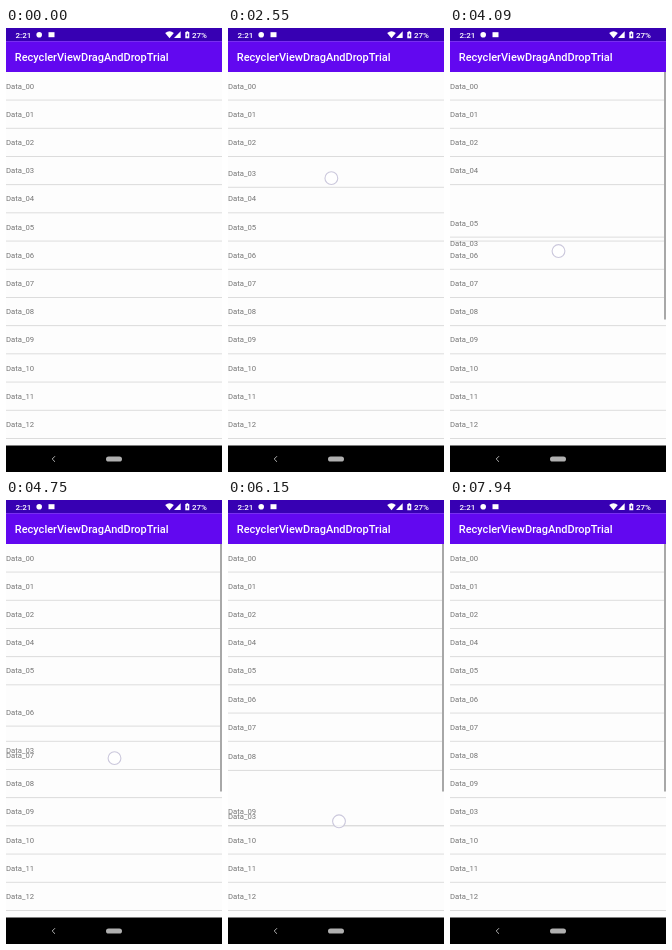
An HTML page that plays this animation: 216x444 px, repeating every 8 s.

```html
<!DOCTYPE html>
<html lang="en">
<head>
<meta charset="utf-8">
<title>Drag and drop list</title>
<style>
  html, body { margin: 0; width: 100%; height: 100%; overflow: hidden; background: #fdfdfd; }
  svg { display: block; font-family: Roboto, Arial, sans-serif; }
  .bar { fill: #fff; font-weight: 500; }
  #list { fill: #757575; font-size: 7.7px; }
  #list rect { fill: #d9d9d9; }
</style>
</head>
<body>
<svg width="216" height="444" viewBox="0 0 216 444">
  <rect width="216" height="444" fill="#fdfdfd"/>
  <g id="list"></g>
  <rect id="scrollbar" x="214" y="44" width="2" height="247.5" fill="#a8a8a8"/>

  <rect width="216" height="13.2" fill="#3700b3"/>
  <rect y="13.2" width="216" height="30.8" fill="#6208f0"/>
  <g class="bar">
    <text x="9.5" y="9.7" font-size="8">2:21</text>
    <circle cx="33.2" cy="6.8" r="2.8"/>
    <rect x="42.5" y="4.2" width="6" height="5"/>
    <path d="M159.2 5 Q163.5 1.6 167.8 5 L163.5 10.2 Z"/>
    <path d="M174.7 3.2 V10 H168 Z"/>
    <path d="M179.3 4 H180.4 V3.2 H182.2 V4 H183.3 V10.2 H179.3 Z"/>
    <path d="M181.7 5 L180.4 7.4 H181.2 V9.2 L182.4 6.8 H181.7 Z" fill="#3700b3"/>
    <text x="186" y="9.7" font-size="8">27%</text>
    <text x="8.8" y="33" font-size="11">RecyclerViewDragAndDropTrial</text>
  </g>

  <rect y="417.5" width="216" height="26.5" fill="#000"/>
  <path d="M49 428.2 L46.2 431 L49 433.8" fill="none" stroke="#b0b0b0" stroke-width="1"/>
  <rect x="100" y="428.4" width="16" height="5.2" rx="2.6" fill="#b0b0b0"/>

  <circle id="touch" r="6.4" fill="#fff" fill-opacity=".75" stroke="#cbc8dc" stroke-width="1.1"/>
</svg>
<script>
const LOOP = 8000, ROW = 28.2, TOP = 44, MOVE = 250, LAG = 100;
const DRAGGED = 3, PRESS = 1220, RELEASE = 7520;
// Start times at which rows 4 to 9 move up past the dragged row
const swaps = [3235, 4030, 4620, 5200, 5930, 6140];
// Finger path: time, x, y
const path = [
  [1220, 102.5, 145], [2350, 102.5, 145], [2700, 104, 154], [3250, 106.5, 181],
  [4090, 108.5, 223], [5350, 108.5, 290], [5750, 110, 310], [6150, 111, 321.3],
  [6600, 111, 324], [7220, 111, 324], [7450, 111, 328]
];

const $ = id => document.getElementById(id);
const clamp = v => Math.max(0, Math.min(1, v));
const ease = v => 0.5 - 0.5 * Math.cos(Math.PI * clamp(v));
const slotY = i => TOP + ROW * i;

function add(parent, tag, attrs) {
  const el = document.createElementNS("http://www.w3.org/2000/svg", tag);
  for (const k in attrs) el.setAttribute(k, attrs[k]);
  return parent.appendChild(el);
}

const rows = Array.from({ length: 13 }, (_, i) => {
  const line = add($("list"), "rect", { y: ROW - 0.6, width: 216, height: 0.9 });
  const label = add($("list"), "text", { y: 16.7 });
  label.textContent = "Data_" + String(i).padStart(2, "0");
  return { line, label };
});

function finger(t) {
  let i = 1;
  while (i < path.length - 1 && t > path[i][0]) i++;
  const [t0, x0, y0] = path[i - 1], [t1, x1, y1] = path[i];
  const p = clamp((t - t0) / (t1 - t0));
  return [x0 + (x1 - x0) * p, y0 + (y1 - y0) * p];
}

function place(el, x, y) {
  el.setAttribute("transform", `translate(${x} ${y})`);
}

function draw(t) {
  const done = swaps.filter(s => t >= s);
  const slot = slotY(DRAGGED + done.length);
  const held = slotY(DRAGGED) + finger(Math.min(t, RELEASE) - LAG)[1] - path[0][2];
  const dragY = held + (slot - held) * ease((t - RELEASE) / MOVE);
  // The divider rests in the new slot while neighbours are moving
  const settling = done.length && t - done[done.length - 1] < MOVE;

  rows.forEach(({ line, label }, i) => {
    const start = swaps[i - DRAGGED - 1];
    const y = i === DRAGGED ? dragY
      : slotY(i) - (start ? ROW * ease((t - start) / MOVE) : 0);
    place(label, 0, y);
    place(line, 0, i === DRAGGED && settling ? slot : y);
  });

  place($("touch"), ...finger(t));
  $("touch").setAttribute("opacity", t < PRESS ? 0 : 1 - clamp((t - RELEASE) / 100));
  $("scrollbar").setAttribute("opacity", t < swaps[0] ? 0 : 1);
}

const begin = performance.now();
function tick() {
  draw((performance.now() - begin) % LOOP);
  requestAnimationFrame(tick);
}
tick();
</script>
</body>
</html>
```
